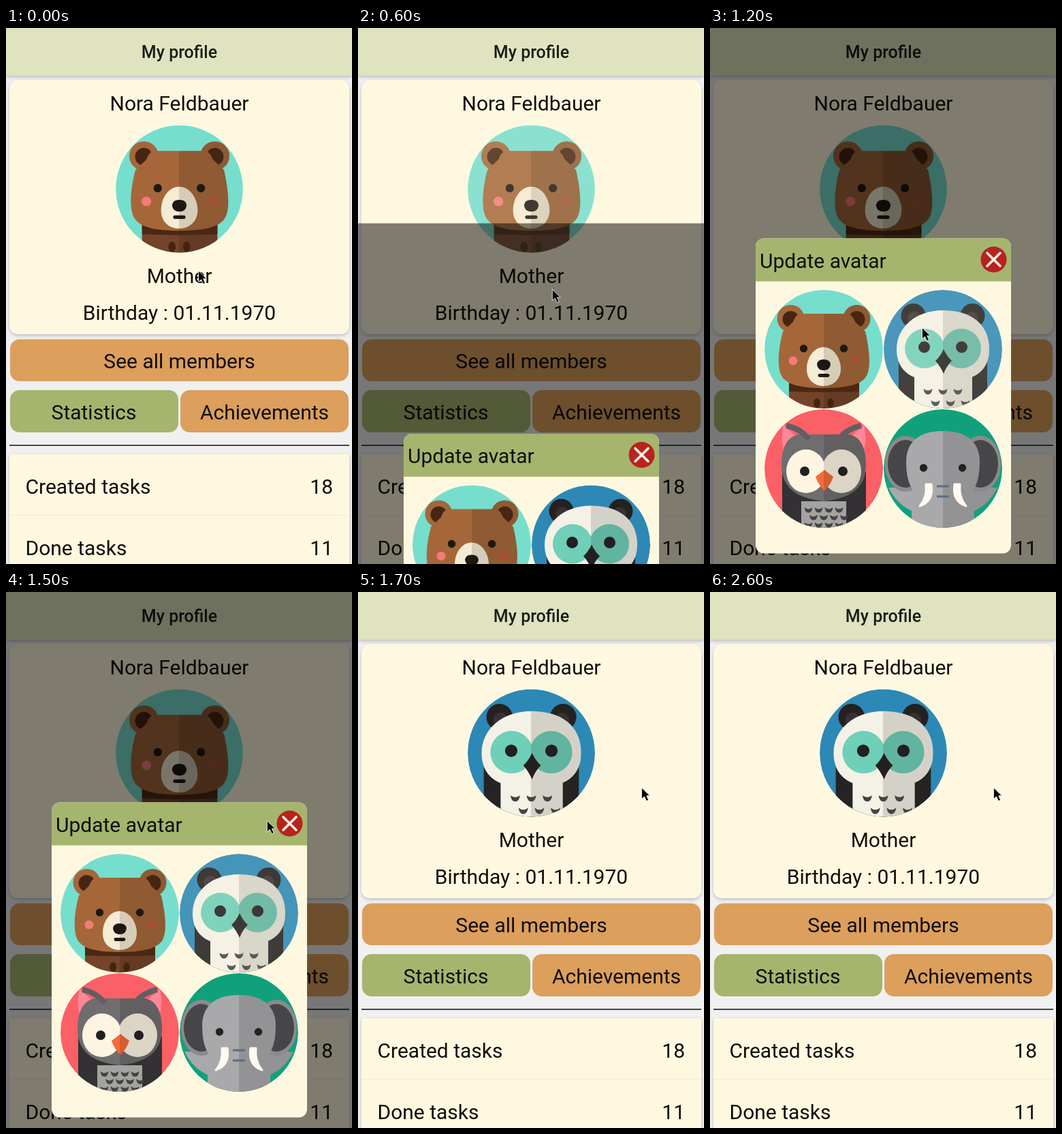
These frames come from a looping animation (508 px wide and 786 px high, 2.7 s). An HTML page:

```html
<!DOCTYPE html>
<html lang="en">
<head>
<meta charset="utf-8">
<title>My profile</title>
<style>
  html, body { margin: 0; height: 100%; overflow: hidden; background: #f0f0f1; }
  svg { display: block; width: 100vw; height: 100vh; }
  text { font: 30px Roboto, sans-serif; fill: #100e0a; }
  .mid { text-anchor: middle; }
  .end { text-anchor: end; }
  .title { font-size: 25px; font-weight: 500; fill: #1c1d19; }
  .card { fill: #fff8e0; }
  .orange { fill: #dc9f5c; }
  .green { fill: #a5b56e; }
</style>
</head>
<body>
<svg viewBox="0 0 508 786">
  <defs>
    <g id="art"></g>
    <clipPath id="disc"><circle r="87"/></clipPath>
    <filter id="shadow" x="-5%" y="-5%" width="110%" height="112%">
      <feDropShadow dx="0" dy="2" stdDeviation="2.5" flood-opacity=".22"/>
    </filter>
  </defs>

  <rect width="508" height="786" fill="#f0f0f1"/>
  <rect y="-10" width="508" height="80" fill="#dfe3bf" filter="url(#shadow)"/>
  <text class="mid title" x="254.5" y="44">My profile</text>

  <rect class="card" x="5" y="76" width="499" height="373" rx="13" filter="url(#shadow)"/>
  <text class="mid" x="254.5" y="121">Nora Feldbauer</text>
  <use id="avatar" transform="translate(254.5 236) scale(1.074)"/>
  <text class="mid" x="254.5" y="374">Mother</text>
  <text class="mid" x="254.5" y="428">Birthday : 01.11.1970</text>

  <rect class="orange" x="6" y="456.5" width="497" height="61.5" rx="14"/>
  <rect class="green" x="6" y="531" width="247" height="62" rx="14"/>
  <rect class="orange" x="256" y="531" width="247" height="62" rx="14"/>
  <text class="mid" x="254.5" y="499">See all members</text>
  <text class="mid" x="129" y="573.5">Statistics</text>
  <text class="mid" x="379.5" y="573.5">Achievements</text>

  <path d="M5 612H504" stroke="#111" stroke-width="1.5"/>
  <rect class="card" x="5" y="625" width="499" height="180" filter="url(#shadow)"/>
  <path d="M5 714.5H504" stroke="#f5eed8" stroke-width="1.5"/>
  <text x="28.5" y="683">Created tasks</text><text class="end" x="480" y="683">18</text>
  <text x="28.5" y="773">Done tasks</text><text class="end" x="480" y="773">11</text>

  <g id="modal">
    <rect width="508" height="786" fill="#000" fill-opacity=".5"/>
    <rect class="card" x="67" y="308.5" width="375" height="462" rx="12"/>
    <path class="green" d="M67 371.5V320.5a12 12 0 0 1 12-12H430a12 12 0 0 1 12 12V371.5Z"/>
    <text x="73" y="351.5">Update avatar</text>
    <circle cx="416.5" cy="339.5" r="19" fill="#b9221e"/>
    <path d="M407 330l19 19m0-19l-19 19" stroke="#fff3e4" stroke-width="3.6" stroke-linecap="round"/>
    <use href="#bear" x="167" y="471"/>
    <use id="pick" href="#panda" x="342" y="471"/>
    <use href="#owl" x="167" y="646"/>
    <use href="#elephant" x="342" y="646"/>
  </g>

  <path id="cursor" d="M0 0V16.5L4 13L7 19.5L10 18L7.2 11.8H12Z" fill="#050505" stroke="#fff" stroke-opacity=".8"/>
</svg>
<script>
const $ = id => document.getElementById(id);

// Flat avatars: every fill is lit on the left half and shaded on the right.
const shade = hex => hex.replace(/\w\w/g, c => Math.round(parseInt(c, 16) * .87).toString(16).padStart(2, '0'));
const fills = {
  coat: '#74442a', ear: '#a3673b', fur: '#a5673a', muzzle: '#f6ecd4', plume: '#f4f1e6',
  patch: '#6fcfb8', slate: '#6f6d6e', eye: '#fdf5e2', beak: '#f66a3a', hide: '#a9a8aa'
};
const gradients = Object.entries(fills).map(([id, color]) =>
  `<linearGradient id="${id}" gradientUnits="userSpaceOnUse" x1="-87" x2="87">
    <stop offset=".5" stop-color="${color}"/><stop offset=".5" stop-color="${shade(color)}"/>
  </linearGradient>`).join('');

const path = (fill, d) => `<path fill="${fill}" d="${d}"/>`;
const lit = (name, d) => path(`url(#${name})`, d);
const pair = (fill, x, y, rx, ry = rx) => [-x, x].map(cx =>
  `<ellipse cx="${cx}" cy="${y}" rx="${rx}" ry="${ry}" fill="${fill}"/>`).join('');
const mirror = shape => `${shape}<g transform="scale(-1 1)">${shape}</g>`;
const avatar = (id, bg, art) =>
  `<g id="${id}" clip-path="url(#disc)"><circle r="87" fill="${bg}"/>${art}</g>`;

// Rows of crescent feathers, each row shifted by half a gap
const feathers = (rows, count, gap, top, step, size) => {
  let d = '';
  for (let row = 0; row < rows; row++)
    for (let i = 0; i < count; i++) {
      const x = (i - (count - 1) / 2 + row % 2 / 2) * gap - size;
      d += `M${x} ${top + row * step}q${size} ${size * .8} ${size * 2} 0q-1 ${size * 1.3}-${size} ${size * 1.3}t-${size}-${size * 1.3}Z`;
    }
  return path('#454244', d);
};

const bear = avatar('bear', '#76decd',
  lit('coat', 'M-51 42H52V90H-51Z') +
  path('#4a2814', 'M-51 62Q0 64 52 62V42H-51Z') +
  pair('url(#ear)', 48.5, -45, 20) + pair('#472513', 48.5, -44, 12) +
  lit('fur', 'M-35-52H36Q42-50 46-40L61-26C67 0 71 32 60 43Q48 57 0 57T-59 43C-70 32-67 0-60-26L-45-40Q-42-50-35-52Z') +
  lit('muzzle', 'M0-3C15-3 25 14 25 29S14 54 0 54S-25 45-25 29S-15-3 0-3Z') +
  '<circle cx="-45" cy="17" r="6.5" fill="#f47a76"/><circle cx="46" cy="17" r="5" fill="#ad4c38"/>' +
  pair('#1d1812', 29.5, -1, 5.7) +
  path('#1d1812', 'M-10 22Q-9 15 0 15T10 22Q9 31 0 31T-10 22ZM-6 36H6a2 2 0 0 1 0 5H-6a2 2 0 0 1 0-5Z') +
  pair('#43240f', 10, 79, 5, 7));

const panda = avatar('panda', '#2d88b6',
  pair('#242121', 43.5, -49, 18) + pair('#3b3030', 42, -45, 10) +
  path('#252323', 'M-65 15H65V90H-65Z') +
  lit('plume', 'M-42 30H43V90H-42Z') +
  lit('plume', 'M0-57C40-57 68-38 68 0C68 32 46 44 20 46H-20C-46 44-68 32-68 0S-40-57 0-57Z') +
  pair('url(#patch)', 27, -1, 29) + pair('#231f20', 27.5, -3, 8.5) +
  path('#231f20', 'M1 0Q6 11 13 17Q5 25 1 36Q-4 25-11 17Q-4 11 1 0Z') +
  feathers(2, 3, 22, 58, 17, 6.5));

const owl = avatar('owl', '#fb6067',
  mirror(path('#ff8798', 'M-59-64L-33-41L-58-22Q-64-44-59-64Z')) +
  path('#333133', 'M-61 5H62V90H-61Z') +
  path('#a3a39f', 'M-33 48H33V90H-33Z') +
  lit('slate', 'M-38-50H38Q62-44 62-5Q62 42 0 48Q-62 42-62-5Q-62-44-38-50Z') +
  mirror('<path d="M-55-63Q-33-58-22-43" fill="none" stroke="#625f62" stroke-width="8"/>') +
  pair('url(#eye)', 26, 4, 29, 32) +
  lit('beak', 'M1 2Q7 7 14 12Q10 24 1 33Q-8 24-12 12Q-5 7 1 2Z') +
  pair('#211f20', 28, 4, 7) +
  feathers(3, 4, 15, 57, 11, 6));

const elephant = avatar('elephant', '#10a17c',
  lit('hide', 'M-46 90V62Q-68 52-80 28H80Q68 52 46 62V90Z') +
  pair('#8b8a8d', 55, -7, 30, 41) + pair('#474548', 55, -7, 26, 35) +
  lit('hide', 'M0-55C36-55 54-38 54-10Q54 36 28 42H-28Q-54 36-54-10C-54-38-36-55 0-55Z') +
  lit('hide', 'M-17 10H18L14 90H-14Z') +
  '<path d="M-9 26H9M-9 41H9" stroke="#596f80" stroke-width="3"/>' +
  mirror('<path d="M-17 23Q-13 48-34 55Q-23 42-25 23Z" fill="#fffaf0" stroke="#fffaf0" stroke-width="3" stroke-linejoin="round"/>') +
  pair('#222', 28.5, -1, 5.7));

$('art').innerHTML = gradients + bear + panda + owl + elephant;

const LOOP = 2700, STEP = 100, HEIGHT = 786;
const OPEN = 500, CLOSE = 1500, SWAP = 1600;

const span = (t, from, length) => Math.min(1, Math.max(0, (t - from) / length));
const smooth = u => u * u * (3 - 2 * u);
const sineOut = u => Math.sin(u * Math.PI / 2);
const cubicOut = u => 1 - (1 - u) ** 3;

// Dims while held, then recovers after release
const press = (t, release) =>
  1 - .8 * (smooth(span(t, release - 150, 150)) - smooth(span(t, release, 250)));

const slideAt = t => t < CLOSE
  ? HEIGHT * (1 - cubicOut(span(t, OPEN, 350)))
  : HEIGHT * span(t, CLOSE, 170) ** 2;

const home = { x: 282.5, y: 356 };
const moves = [
  { from: 0, length: 400, x: 269, y: 306, easeX: smooth, easeY: smooth },
  { from: 500, length: 400, x: 311.5, y: 439.5, easeX: sineOut, easeY: cubicOut },
  { from: 1200, length: 480, x: 416.5, y: 287, easeX: smooth, easeY: smooth }
];

function cursorAt(t) {
  let { x, y } = home;
  for (const move of moves) {
    const u = span(t, move.from, move.length);
    x += (move.x - x) * move.easeX(u);
    y += (move.y - y) * move.easeY(u);
  }
  return `translate(${x} ${y})`;
}

function draw(t) {
  const slide = slideAt(t);
  $('cursor').setAttribute('transform', cursorAt(t));
  $('modal').setAttribute('transform', `translate(0 ${slide})`);
  $('modal').setAttribute('visibility', slide < HEIGHT ? 'visible' : 'hidden');
  $('avatar').setAttribute('href', t < SWAP ? '#bear' : '#panda');
  $('avatar').setAttribute('opacity', press(t, 420));
  $('pick').setAttribute('opacity', press(t, 1310));
}

const start = performance.now();
function tick() {
  const t = (performance.now() - start) % LOOP;
  draw(Math.floor(t / STEP) * STEP);
  requestAnimationFrame(tick);
}
draw(0);
requestAnimationFrame(tick);
</script>
</body>
</html>
```
